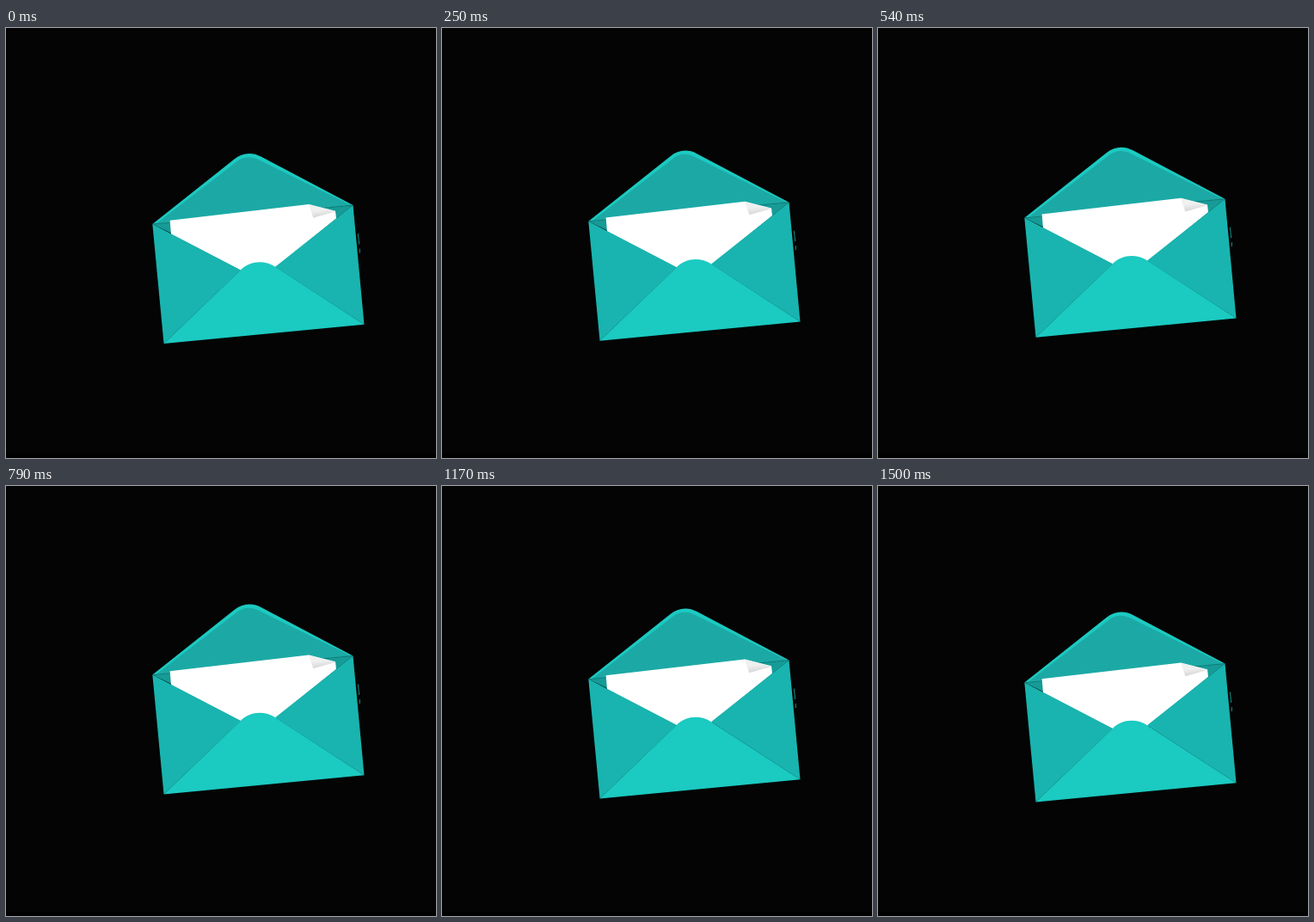
Recreate the animation shown at these times as an HTML page. Size 500 px wide and 500 px high, loop 1540 ms.

```html
<!DOCTYPE html>
<html lang="en">
<head>
<meta charset="utf-8">
<title>Floating envelope</title>
<style>
  html, body { margin: 0; width: 100%; height: 100%; overflow: hidden; background: #040404; }
  svg { display: block; width: 100vw; height: 100vh; }
</style>
</head>
<body>
<svg viewBox="0 0 500 500">
  <defs>
    <linearGradient id="curl" x1="0" y1="0" x2=".25" y2="1">
      <stop offset=".5" stop-color="#f0f0f0"/>
      <stop offset="1" stop-color="#d6d6d6"/>
    </linearGradient>
  </defs>
  <rect y="495" width="500" height="5"/>
  <g id="envelope">
    <!-- open flap -->
    <path fill="#1bcac1" d="M170.3 228 L265.5 152.5 C274 145 286 144 296 149.3 L403.5 206Z"/>
    <path fill="#1ca9a5" d="M174 228 L267.5 156 C275 149.5 284 148.5 293 152.8 L401 206Z"/>
    <!-- pocket -->
    <path fill="#169b97" d="M170.3 228 L403.5 206 L313 278 H273Z"/>
    <path fill="none" stroke="#117a77" stroke-width=".8" d="M172 228 L403 206"/>
    <!-- letter -->
    <path fill="#fff" d="M190.6 223.8 L352 205 L383 212.8 L384 221.5 L313 279 L294 290 L273 282 L192 240Z"/>
    <path fill="url(#curl)" d="M352 205 L383 213.5 L357.3 220.7Z"/>
    <!-- sides and front -->
    <path fill="#19b4af" d="M170.3 228 L273 281.5 L183.5 367Z M403.5 206 L313 277.8 L416.5 344.8Z"/>
    <path fill="#1bcac1" d="M183.5 367 L273 281.3 C284 270 301 270 313 277.6 L416.5 344.8Z"/>
    <path fill="none" stroke="#1a9e99" stroke-width=".9" d="M409.3 239 L410.7 251.5 M411.3 256.5 V261.5"/>
  </g>
</svg>
<script>
  const LOOP = 1540, FRAME = 1000 / 24;
  const PEAK = 1482, HEIGHT = 10.4, LOWEST = 0.8;
  const envelope = document.getElementById('envelope');

  // 24 fps steps, each starting on a 10 ms tick
  const stepped = t => Math.floor((Math.floor(t / 10) * 10 + 8.4) / FRAME) * FRAME;

  // steady rise and fall
  function offset(t) {
    const phase = ((t - PEAK + LOOP) % LOOP) / LOOP;
    return LOWEST - HEIGHT * (1 - Math.abs(1 - 2 * phase));
  }

  function draw() {
    const y = offset(stepped(performance.now() % LOOP));
    envelope.setAttribute('transform', `translate(0 ${y.toFixed(3)})`);
    requestAnimationFrame(draw);
  }
  draw();
</script>
</body>
</html>
```
